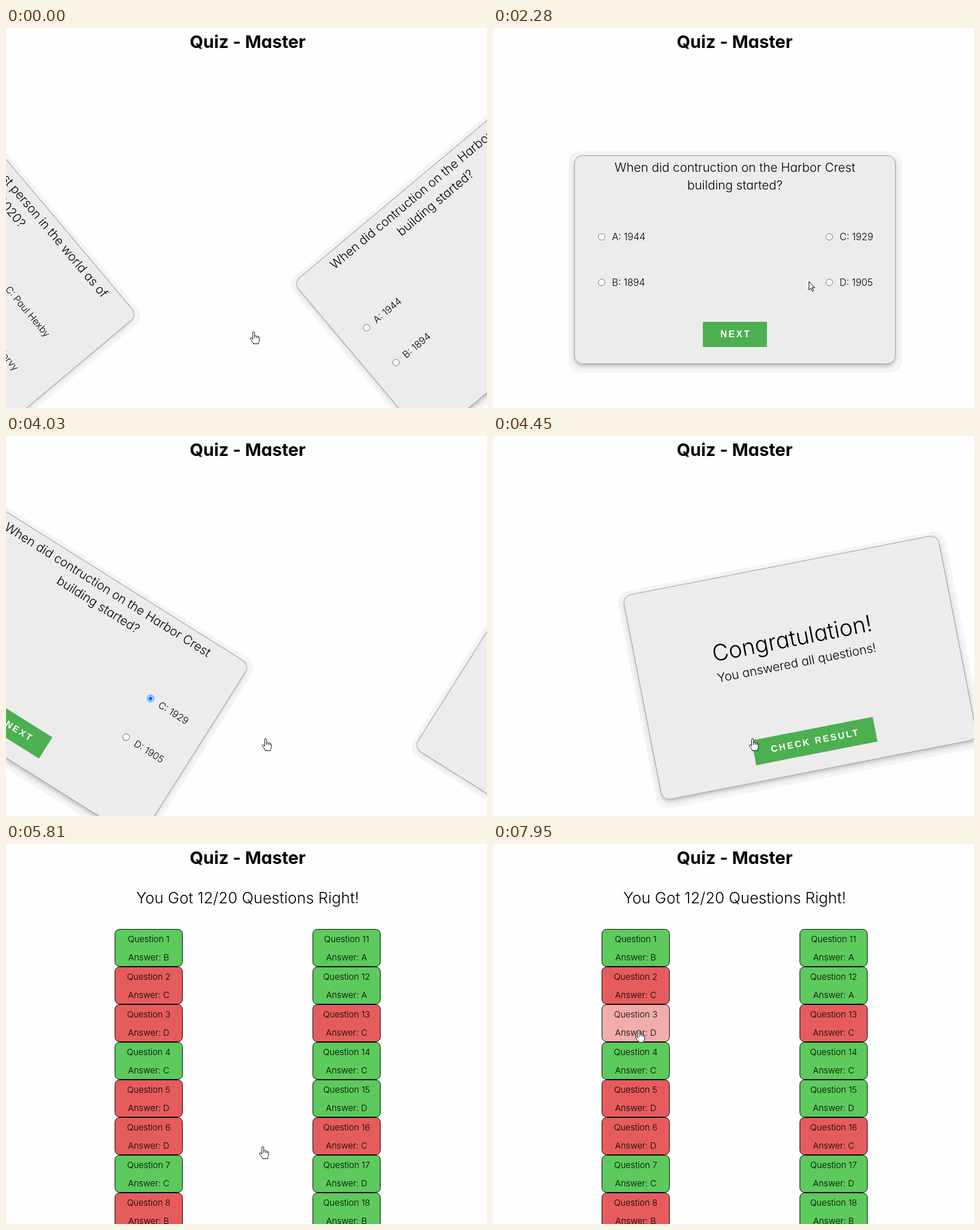
Animation, 841 px wide and 666 px high, one loop 8000 ms. Source, as an HTML page:

```html
<!DOCTYPE html>
<html lang="en">
<head>
<meta charset="utf-8">
<title>Quiz</title>
<style>
  html, body { margin: 0; width: 100%; height: 100%; overflow: hidden; background: #fefefe; }
  svg { display: block; width: 841px; height: 666px; }
  text { font-family: Inter, "Open Sans", sans-serif; font-weight: 300; font-feature-settings: "cv11"; }
  .mid { text-anchor: middle; }
  .title { font-size: 30.4px; font-weight: 700; }
  .ask { font-size: 21.6px; }
  .opt { font-size: 16.8px; }
  .big { font-size: 39.6px; }
  .score { font-size: 27px; }
  .cell { font-size: 15.1px; }
  .btn { font: bold 16px "Liberation Sans", Arial, sans-serif; letter-spacing: 2.8px; fill: #fff; }
  .halo { fill: #f4f4f4; }
  .panel { fill: #ececec; stroke: #999; filter: drop-shadow(0 4px 3px rgba(0, 0, 0, .2)); }
  .ring { fill: #fff; stroke: #767676; }
  .dot { fill: none; }
  .on .ring { stroke: #0075ff; }
  .on .dot { fill: #0075ff; }
  #cursor path { fill: #fff; stroke: #000; stroke-linejoin: round; }
</style>
</head>
<body>
<svg id="stage" viewBox="0 0 841 666"></svg>
<script>
const LOOP = 8000, MOVE = 1165, TRAVEL = 925.1;
const FIRST = -375, SECOND = 3765, RESULT = 5810, PICK = 2830;
const CX = 423, CY = 406;

// Redraw moments: [from, to, count], evenly spread.
const STEPS = [
  [0, 0, 1], [160, 450, 3], [610, 880, 3], [1020, 1390, 4], [1530, 1780, 3],
  [1920, 2410, 5], [2550, 2550, 1], [2700, 3190, 5], [3330, 3730, 4], [3870, 3870, 1],
  [4030, 4300, 3], [4450, 4750, 3], [4890, 5260, 4], [5810, 5960, 2], [6090, 6230, 2],
  [7190, 7550, 4], [7700, 7950, 3]
];
const ticks = STEPS.flatMap(([a, b, n]) =>
  Array.from({ length: n }, (_, i) => n > 1 ? a + (b - a) * i / (n - 1) : a));

// Pointer path: [time, x, y]
const PATH = [
  [0, 433, 533], [750, 433, 533], [880, 440, 505], [1143, 372, 455], [1390, 318, 434],
  [1530, 272, 437], [1780, 451, 438], [2270, 580, 445], [2410, 579, 448], [2550, 584, 394],
  [2700, 586, 363], [2950, 586, 365], [3190, 551, 411], [3330, 502, 470], [3463, 461, 523],
  [3597, 454, 530], [3730, 454, 531], [4890, 454, 531], [5020, 449, 531], [5810, 449, 531],
  [5960, 448, 531], [7060, 448, 531], [7550, 316, 391], [7700, 284, 352], [7825, 259, 331], [7950, 255, 327]
];
const HAND = [[0, 820], [3530, 5900], [7650, LOOP]];

const stage = document.getElementById("stage");

function add(parent, tag, attrs = {}, content) {
  const el = document.createElementNS("http://www.w3.org/2000/svg", tag);
  for (const k in attrs) el.setAttribute(k, attrs[k]);
  if (content) el.textContent = content;
  parent.append(el);
  return el;
}

const write = (parent, cls, x, y, content) => add(parent, "text", { class: cls, x, y }, content);

function makeCard() {
  const g = add(stage, "g");
  add(g, "rect", { class: "halo", x: 132, y: 216, width: 583, height: 388, rx: 21 });
  add(g, "rect", { class: "panel", x: 142.5, y: 223.5, width: 561, height: 365, rx: 14 });
  return g;
}

function addButton(card, label, width) {
  add(card, "rect", { x: CX - width / 2, y: 515, width, height: 44, fill: "#4caf50" });
  write(card, "btn mid", CX + 1.4, 542, label);
}

function addOption(card, x, y, label) {
  const g = add(card, "g");
  add(g, "circle", { class: "ring", cx: x, cy: y, r: 5.8 });
  add(g, "circle", { class: "dot", cx: x, cy: y, r: 3.6 });
  write(g, "opt", x + 18, y + 6, label);
  return g;
}

function makeQuestion(lines, options) {
  const card = makeCard();
  lines.forEach((s, i) => write(card, "ask mid", CX, 252 + 31 * i, s));
  const marks = options.map(o => addOption(card, ...o));
  addButton(card, "NEXT", 112);
  return { card, marks };
}

write(stage, "title mid", 422.5, 35, "Quiz - Master");

const past = makeQuestion(
  ["Who is the richest person in the world as of", "2020?"],
  [[502, 366, "C: Paul Hexby"], [502, 446, "D: Abdiel Korvy"]]);
const now = makeQuestion(
  ["When did contruction on the Harbor Crest", "building started?"],
  [[190, 366, "A: 1944"], [190, 446, "B: 1894"], [588, 366, "C: 1929"], [588, 446, "D: 1905"]]);
const done = makeCard();
write(done, "big", 277, 367, "Congratulation!");
write(done, "ask", 277.5, 404, "You answered all questions!");
addButton(done, "CHECK RESULT", 216);
const cards = [past.card, now.card, done];

const result = add(stage, "g");
write(result, "score mid", 422.5, 104, "You Got 12/20 Questions Right!");
const cells = [];
function addColumn(x, first, answers, marks) {
  [...answers].forEach((a, i) => {
    const y = 150 + 66 * i;
    cells.push(add(result, "rect", {
      x: x + .5, y: y - .5, width: 118, height: 65, rx: 8, stroke: "#000",
      fill: marks[i] === "+" ? "#5cca5c" : "#e65c5c"
    }));
    write(result, "cell mid", x + 59.5, y + 22, "Question " + (first + i));
    write(result, "cell mid", x + 59.5, y + 54, "Answer: " + a);
  });
}
addColumn(190, 1, "BCDCDDCB", "+--+--+-");
addColumn(536, 11, "AACCDCDB", "++-++-++");

const cursor = add(stage, "g", { id: "cursor" });
const arrow = add(cursor, "path", { d: "M.5 .5V15L3.8 11.9 6 17.3 8.4 16.3 6.1 11H10.6Z" });
const hand = add(cursor, "g");
add(hand, "path", {
  d: "M-1.7 12.5V1.2a1.7 1.7 0 0 1 3.4 0V7c.6-1.2 2.8-1 3.2.4.8-.9 2.6-.5 2.9.8 1-.6 2.2 0 2.2 1.4V14c0 2-1 3-1.4 4.5v2H-.8V19c-1.2-2-3.4-4.2-4.6-6.6-.9-1.8.6-3 2-2Z"
});
add(hand, "path", { d: "M1.7 7v3.5M4.9 7.5v3M7.8 8.5v2.5" });

const clamp = v => Math.min(1, Math.max(0, v));

// cubic-bezier(.25, .1, .25, 1)
function ease(x) {
  if (x <= 0 || x >= 1) return clamp(x);
  const bez = (s, a, b) => 3 * (1 - s) ** 2 * s * a + 3 * (1 - s) * s * s * b + s ** 3;
  let lo = 0, hi = 1;
  for (let i = 0; i < 24; i++) {
    const s = (lo + hi) / 2;
    if (bez(s, .25, .25) < x) lo = s; else hi = s;
  }
  return bez(lo, .1, 1);
}

function pointer(t) {
  const i = PATH.findIndex(p => p[0] > t);
  if (i < 0) return PATH[PATH.length - 1].slice(1);
  const [a, ax, ay] = PATH[i - 1], [b, bx, by] = PATH[i];
  const k = (t - a) / (b - a);
  return [Math.round(ax + (bx - ax) * k), Math.round(ay + (by - ay) * k)];
}

const show = (el, on) => el.setAttribute("display", on ? "inline" : "none");

function draw(t) {
  const p = ease((t - FIRST) / MOVE), q = ease((t - SECOND) / MOVE);
  [-p, 1 - p - q, 1 - q].forEach((d, i) => {
    show(cards[i], t < RESULT && Math.abs(d) < 1);
    cards[i].setAttribute("transform", `translate(${d * TRAVEL} 0) rotate(${-90 * d} ${CX} ${CY})`);
  });
  now.marks[2].setAttribute("class", t >= PICK ? "on" : "");

  show(result, t >= RESULT);
  cells[2].setAttribute("fill-opacity", 1 - .5 * clamp((t - 7640) / 300));

  const isHand = HAND.some(([a, b]) => t >= a && t < b);
  show(hand, isHand);
  show(arrow, !isHand);
  cursor.setAttribute("transform", `translate(${pointer(t)})`);
}

function frame() {
  const t = performance.now() % LOOP;
  draw(ticks.filter(k => k <= t).pop());
  requestAnimationFrame(frame);
}
frame();
</script>
</body>
</html>
```
